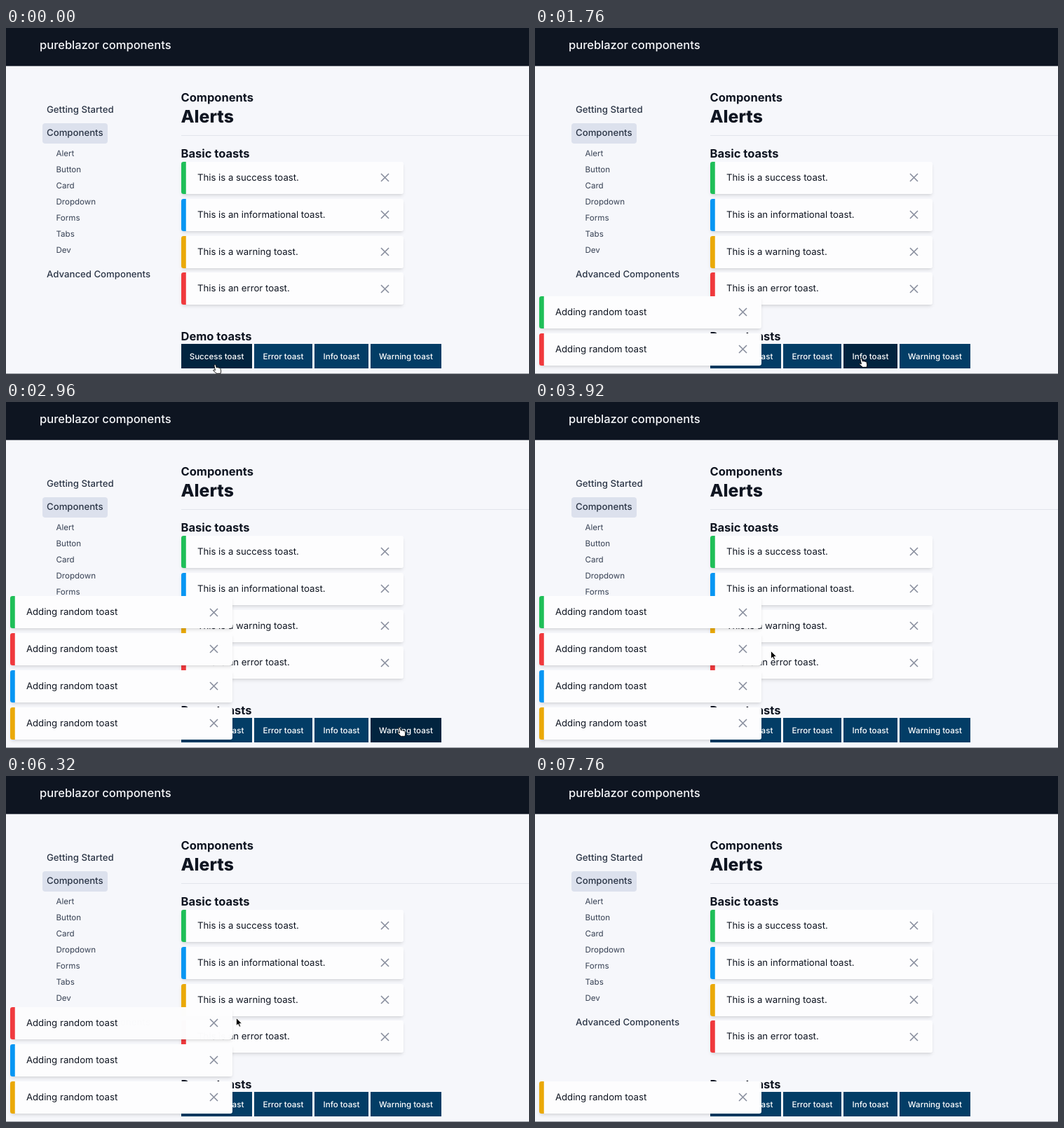
Recreate the animation shown at these times as an HTML page. Size 746 by 494 pixels, loop 7.84 s.

```html
<!DOCTYPE html>
<html lang="en">
<head>
<meta charset="utf-8">
<title>Alerts</title>
<style>
  html, body { margin: 0; width: 100%; height: 100%; overflow: hidden; }
  body { position: relative; background: #f6f7fb; color: #0f1521; font: 13.2px/20px Inter, sans-serif;
         text-rendering: geometricPrecision; }
  body * { position: absolute; box-sizing: border-box; white-space: nowrap; }
  header { left: 0; top: 0; width: 100%; height: 55px; background: #0e1521; border-bottom: 1px solid #a5a8af; }
  header span { left: 48px; top: 14px; font-size: 16.5px; font-weight: 500; color: #f5f6f9; }
  .nav { left: 58px; font-weight: 500; color: #2b3546; }
  .pill { left: 52px; top: 135.5px; width: 93px; height: 29px; border-radius: 4px; background: #dce1ed; }
  .sub { left: 71.5px; font-size: 11.55px; color: #364053; }
  .head { left: 249.5px; font-size: 16.5px; font-weight: 700; }
  h1 { left: 249.5px; top: 116px; margin: 0; font-size: 24.75px; font-weight: 800; line-height: 20px; }
  .rule { left: 250px; top: 153px; right: 0; height: 1px; background: #e2e5ec; }
  .edge { left: 0; top: 493px; width: 100%; height: 1px; background: #989ba2; }
  .btn { top: 451px; height: 35px; line-height: 36px; text-align: center;
         font-size: 11.55px; font-weight: 500; color: #fff; background: #033d66; }
  .btn.hover { background: #02243f; }
  .toast { width: 316.8px; height: 46.2px; border-radius: 3.3px;
           background: linear-gradient(90deg, var(--band) 6.4px, #fdfdfe 6.8px);
           box-shadow: 0 3.3px 5px -.8px #0000001a, 0 1.7px 3.3px -1.7px #0000001a; }
  .toast span { left: 23.1px; top: 13px; color: #0f1521; }
  .toast svg { left: 283.8px; top: 16.4px; width: 13px; height: 13px; stroke: #888e9d; stroke-width: 1.6; }
  #cursor { left: 0; top: 0; width: 12px; height: 14px; overflow: visible; }
</style>
</head>
<body>
<header><span>pureblazor components</span></header>
<div class="pill"></div>
<div class="rule"></div>
<h1>Alerts</h1>
<div class="edge"></div>
<script>
const LOOP = 7840, STEP = 80, LIFE = 5000, FADE = 600, PITCH = 52.8;
const COLORS = { success: '#1fbf58', info: '#0796f3', warning: '#eaa908', error: '#f0393d' };

function add(cls, text, style) {
  const el = document.createElement('div');
  el.className = cls;
  el.textContent = text;
  Object.assign(el.style, style);
  document.body.append(el);
  return el;
}
const label = (cls, text, middle) => add(cls, text, { top: middle - 10 + 'px' });

function addToast(kind, text, x, y) {
  const el = add('toast', '', { left: x + 'px', top: y + 'px' });
  el.style.setProperty('--band', COLORS[kind]);
  el.innerHTML = `<span>${text}</span><svg viewBox="0 0 13 13"><path d="M1 1 12 12M12 1 1 12"/></svg>`;
  return el;
}

label('nav', 'Getting Started', 117);
label('nav', 'Components', 150);
['Alert', 'Button', 'Card', 'Dropdown', 'Forms', 'Tabs', 'Dev']
  .forEach((name, i) => label('sub', name, 178.6 + i * 23.1));
label('nav', 'Advanced Components', 351.5);

label('head', 'Components', 99);
label('head', 'Basic toasts', 179);
label('head', 'Demo toasts', 439.5);
[['success', 'a success'], ['info', 'an informational'], ['warning', 'a warning'], ['error', 'an error']]
  .forEach(([kind, words], i) => addToast(kind, `This is ${words} toast.`, 249.8, 190.9 + i * PITCH));

const buttons = [['Success', 250, 351], ['Error', 354, 437], ['Info', 440, 517], ['Warning', 520, 621]]
  .map(([name, x0, x1]) => ({
    x0, x1, el: add('btn', name + ' toast', { left: x0 + 'px', width: x1 - x0 + 'px' })
  }));

const toasts = [['success', 400], ['error', 1280], ['info', 2080], ['warning', 2840]]
  .map(([kind, born]) => ({ born, el: addToast(kind, 'Adding random toast', 5.8, 0) }));

document.body.insertAdjacentHTML('beforeend', `
<svg id="cursor" viewBox="0 0 12 14" stroke-linejoin="round">
  <path id="hand" fill="#fff" stroke="#000" stroke-width=".9" d="M3.3 8 1.9 1.9Q2 .6 3.1.6 4 .6 4.3 1.6L5.3 5Q6.3 4 7.1 5 8.3 4.3 9 5.4 10.4 5 11 6.5L11.6 9.3Q11.8 11 11 13.3H5.2Q4 11.6 1.2 9.7.2 8.6 1.2 8 2.2 7.7 3.3 8.9Z"/>
  <path id="arrow" fill="#000" stroke="#fff" stroke-width=".8" d="M2.5.5V11.5L5.1 9.2 6.8 13.2 8.7 12.4 7 8.6H10.5Z"/>
</svg>`);
const [cursor, hand, arrow] = ['cursor', 'hand', 'arrow'].map(id => document.getElementById(id));

// Cursor stops: time, x, y
const path = [
  [0, 301, 487], [400, 301, 487], [720, 386, 478], [1280, 386, 478], [1680, 468, 478], [2080, 468, 478],
  [2560, 564, 471], [3200, 564, 471], [3760, 340, 362], [4320, 340, 362], [5000, 332, 352], [LOOP, 332, 352]
];
const CURSOR_END = 7200;
const smooth = p => p * p * (3 - 2 * p);

function cursorAt(t) {
  const i = path.findIndex(p => p[0] > t);
  const [t0, x0, y0] = path[i - 1], [t1, x1, y1] = path[i];
  const p = smooth((t - t0) / (t1 - t0));
  return [x0 + (x1 - x0) * p, y0 + (y1 - y0) * p];
}

function draw(t) {
  toasts.forEach(({ born, el }) => {
    const age = t - born;
    const below = toasts.filter(o => o.born > born && o.born <= t).length;
    const fade = Math.min(1, Math.max(0, (age - LIFE) / FADE));
    el.style.display = age < 0 || fade === 1 ? 'none' : '';
    el.style.top = 435.7 - below * PITCH + 'px';
    el.style.opacity = 1 - smooth(fade);
  });

  const [x, y] = cursorAt(t);
  let over = false;
  buttons.forEach(({ x0, x1, el }) => {
    const hit = x - 2 >= x0 && x - 2 < x1 && y - 5 >= 451 && y - 5 < 486;
    el.classList.toggle('hover', hit);
    over = over || hit;
  });
  cursor.style.transform = `translate(${x - 6}px, ${y - 7}px)`;
  cursor.style.display = t < CURSOR_END ? '' : 'none';
  hand.style.display = over ? '' : 'none';
  arrow.style.display = over ? 'none' : '';
}

const start = performance.now();
function tick() {
  const t = (performance.now() - start) % LOOP;
  draw(Math.floor(t / STEP) * STEP);
  requestAnimationFrame(tick);
}
tick();
</script>
</body>
</html>
```
